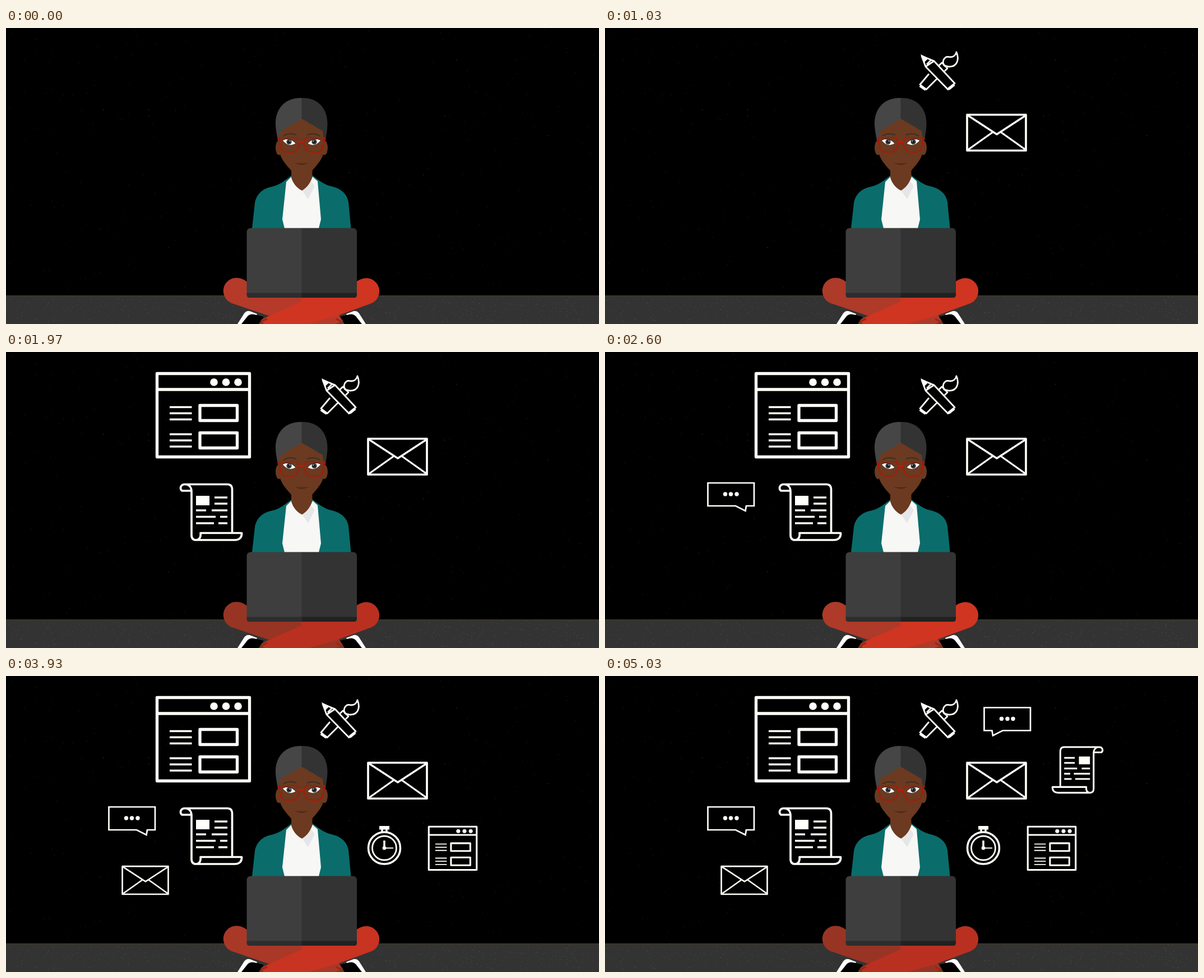
Recreate the animation shown at these times as an HTML page. Size 1058 px wide and 529 px high, loop 5.63 s.

```html
<!DOCTYPE html>
<html lang="en">
<head>
<meta charset="utf-8">
<title>Working at a laptop</title>
<style>
html, body { margin: 0; width: 100%; height: 100%; overflow: hidden; background: #000; }
svg { display: block; width: 100vw; height: 100vh; }
.line { fill: none; stroke: #fffffa; stroke-linejoin: round; }
.solid { fill: #fffffa; stroke: none; }
.dull { fill: var(--dull); }
.bright { fill: var(--bright); }
[data-at] { visibility: hidden; }
</style>
</head>
<body>
<svg viewBox="0 0 1058 529">
  <defs>
    <g id="mail">
      <path d="M646 155H751V219H646Z"/>
      <path stroke-width="3.3" d="M647 156L699 190L751 156M647 218L692 186M751 218L706 186"/>
    </g>
    <g id="bubble" stroke-width="2.7" style="stroke-linejoin:miter">
      <path d="M183.5 234H266V275H252L250.5 284L233 275H183.5Z"/>
      <g class="solid"><circle cx="214.5" cy="254" r="3.7"/><circle cx="224.5" cy="254" r="3.7"/><circle cx="235" cy="254" r="3.7"/></g>
    </g>
    <g id="scroll" stroke-width="3.7">
      <path d="M330 248H314C309 244 312 236.5 319 236.5H395C401 236.5 403.5 240 403.5 246V322M319 236.5C327 236.5 331 242 331 250V327C331 333 334 336 339 336H408C417 336 421 331 420.5 323.5H347C348 331 345 336 339 336"/>
      <path d="M372 260H395M372 271H395M339 283H357M367 283H395M339 294.5H374M382 294.5H395M339 306H371M379 306H395"/>
      <rect class="solid" x="339" y="257" width="24" height="17"/>
    </g>
    <g id="window">
      <path d="M269.5 38.5H434.5V187.5H269.5ZM270 67H434M346 95.5H412.5V122.5H346ZM346 144.5H412.5V171.5H346Z"/>
      <path stroke-width="3.5" d="M292 98.5H331.5M292 109.5H331.5M292 120.5H331.5M292 147H331.5M292 158H331.5M292 169H331.5"/>
      <g class="solid"><circle cx="371" cy="54" r="6.8"/><circle cx="392.5" cy="54" r="6.8"/><circle cx="414" cy="54" r="6.8"/></g>
    </g>
  </defs>

  <path id="stars" stroke="#29240f"/>
  <path id="sparks" stroke="#5a502c"/>
  <rect y="478" width="1058" height="51" fill="#333"/>
  <path d="M0 478.5H1058" stroke="#57400f"/>
  <path id="grit" stroke="#505050"/>

  <!-- shoes -->
  <g id="shoe">
    <path fill="#fff" d="M413 529L425 510Q429 504.5 435 506L448 511L440 529Z"/>
    <path fill="#000" d="M420 529L431 515Q436 510 443 512L460 516L452 529Z"/>
    <path fill="#6b3a20" d="M451 529L456 521L468 517V529Z"/>
  </g>
  <use href="#shoe" transform="matrix(-1 0 0 1 1055 0)"/>

  <!-- legs -->
  <path class="dull" d="M411.5 446.5C419 446.5 425 450 431 454L528 476V529H588L601 524L594 513L520 505L468 514L403 492A23.5 23.5 0 0 1 411.5 446.5Z"/>
  <path class="bright" d="M643.5 447C636 447 630 450 624 454L527 476V489L468 515L455 522L460 529H540L595 513L652 492A23.5 23.5 0 0 0 643.5 447Z"/>
  <path d="M456 524L466 520M589 520L599 525" stroke="#a32112" stroke-width="3"/>

  <!-- jacket and shirt -->
  <path fill="#0a6d6b" d="M510 263C498 272 490 280 475 283.5C455 287 446 300 444 313L439 358H615.5L611 311C608 296 598 287 581 283C567 280 558 272 546 263Z"/>
  <path fill="#f7f7f6" d="M509 266L500 275L493 342L497 358H558L562 342L556 274L547 266L528 284Z"/>
  <path fill="#e6e6e8" d="M528 290L545 270L555 274L539 306Z"/>
  <path fill="#f7f7f6" d="M547 266L556 274L551 283L543 272Z"/>

  <!-- head -->
  <g fill="#6b3a20">
    <ellipse cx="487" cy="214" rx="6" ry="13"/>
    <ellipse cx="568" cy="214" rx="6" ry="13"/>
    <path d="M487 155H568V214C567 235 553 246 546.5 255V267C542 279 536 286 528 290.5C519 286 512 278 509 267V255C502 246 488 235 487 214Z"/>
  </g>
  <path fill="#464646" d="M528 125C499 124 481 143 481 171C481 183 484 192 485 202L489 201V185L528 162Z"/>
  <path fill="#333" d="M527.5 125C556 124 573.5 143 573.5 171C573.5 183 571 192 570 202L567 200L565 184L527.5 162Z"/>
  <g id="eye">
    <path d="M495 193Q505 186 518 191" fill="none" stroke="#38302b" stroke-width="2"/>
    <path d="M493.5 200.5Q506 194 517 206Q504 214 493.5 200.5Z" fill="#fff"/>
    <path d="M493 200.5Q506 194 517 206" fill="none" stroke="#2a1a14" stroke-width="1"/>
    <circle cx="505" cy="203.5" r="4.6" fill="#30363b"/>
    <circle cx="505" cy="203.5" r="1.8" fill="#111"/>
    <circle cx="506.5" cy="202" r="1" fill="#ccc"/>
    <path d="M486 196H519L525 204L518 219L513 221.5H497L491 217Z" fill="none" stroke="#b11406" stroke-width="1.8" stroke-linejoin="round"/>
    <path d="M485 197L490 201" stroke="#b11406" stroke-width="2.5"/>
  </g>
  <use href="#eye" transform="matrix(-1 0 0 1 1055 0)"/>
  <path d="M523 203.5H532" stroke="#c41808" stroke-width="3"/>
  <path d="M515 241Q522 242 527.5 242Q533 242 540 241Q528 248 515 241Z" fill="#4d2916"/>

  <!-- laptop -->
  <path fill="#3e3e3e" d="M528 357.5H437Q429.5 357.5 429.5 365V474H528Z"/>
  <path fill="#333" d="M527.5 357.5H618.5Q626 357.5 626 365V474H527.5Z"/>
  <path fill="#2d2d2d" d="M429.5 473.5H528V482H434Q429.5 482 429.5 477Z"/>
  <path fill="#212121" d="M527.5 473.5H626V477Q626 482 621.5 482H527.5Z"/>

  <!-- icons -->
  <g class="line">
    <use href="#mail" data-at="500" stroke-width="3.7"/>
    <g data-at="1030" stroke-width="2.8">
      <path d="M578 82L562 101L573 110L592 91M596 67L601 62L611 72L606 77M572 69L587 59L624 99L612 110ZM572 69L565 50L587 59M574 65L582 57"/>
      <path d="M605 67C600 58 607 49 615 52C622 52 626 48 627 43C633 58 627 70 613 69Z"/>
      <path class="solid" d="M563 47L577 54L570 61Z"/>
      <path stroke-width="5" d="M562 103L572 110M613 109L623 101"/>
    </g>
    <use href="#scroll" data-at="1500"/>
    <use href="#window" data-at="1970" stroke-width="5.3"/>
    <use href="#bubble" data-at="2600"/>
    <g data-at="3030" stroke-width="3.5">
      <circle cx="675" cy="307.5" r="28.5"/>
      <circle cx="675" cy="307.5" r="21.5" stroke-width="2.8"/>
      <path d="M671 274V280M679 274V280M675 294V307"/>
      <path d="M675 307.5H691" stroke-width="2"/>
      <rect class="solid" x="666" y="268" width="18" height="6.5"/>
      <circle class="solid" cx="675" cy="307.5" r="3.3"/>
    </g>
    <use href="#mail" data-at="3530" transform="translate(206 338.5) scale(.78) translate(-644 -153)" stroke-width="3.4"/>
    <use href="#window" data-at="3930" transform="translate(753 268) scale(.518) translate(-267 -36)" stroke-width="6"/>
    <use href="#bubble" data-at="4500" transform="matrix(-1 0 0 1 942.5 -177.5)"/>
    <use href="#scroll" data-at="5030" transform="translate(889 125) scale(-.82 .82) translate(-310 -234)"/>
  </g>
</svg>
<script>
const LOOP = 5630;
// start time, shaded leg, lit leg
const legs = [
  [0, '#b53a29', '#cf3520'],
  [500, '#983423', '#b93020'],
  [1030, '#ae3a29', '#cf3520'],
  [1500, '#983423', '#b93020'],
  [2600, '#ae3a29', '#cf3520'],
  [3030, '#983423', '#b93020'],
  [3930, '#a93827', '#c93321'],
  [4500, '#ae3a29', '#cf3520'],
  [5030, '#983423', '#b93020']
];
const byId = id => document.getElementById(id);

let seed = 17;
const rand = () => (seed = seed * 16807 % 2147483647) / 2147483647;
const dot = ([x, y]) => `M${x} ${y + .5}h1`;
function scatter(id, count, top, height) {
  const spots = Array.from({ length: count }, () =>
    [Math.floor(rand() * 1058), top + Math.floor(rand() * height)]);
  byId(id).setAttribute('d', spots.map(dot).join(''));
}
scatter('stars', 260, 0, 470);
scatter('grit', 500, 481, 46);
byId('sparks').setAttribute('d', [
  [254, 157], [173, 146], [803, 57], [966, 192], [612, 258],
  [289, 392], [605, 69], [782, 157], [254, 146], [744, 262]
].map(dot).join(''));

const icons = [...document.querySelectorAll('[data-at]')];
const root = document.documentElement.style;
function draw() {
  const t = performance.now() % LOOP;
  for (const icon of icons)
    icon.style.visibility = t >= +icon.dataset.at ? 'visible' : 'hidden';
  const [, dull, bright] = legs.findLast(step => t >= step[0]);
  root.setProperty('--dull', dull);
  root.setProperty('--bright', bright);
  requestAnimationFrame(draw);
}
draw();
</script>
</body>
</html>
```
